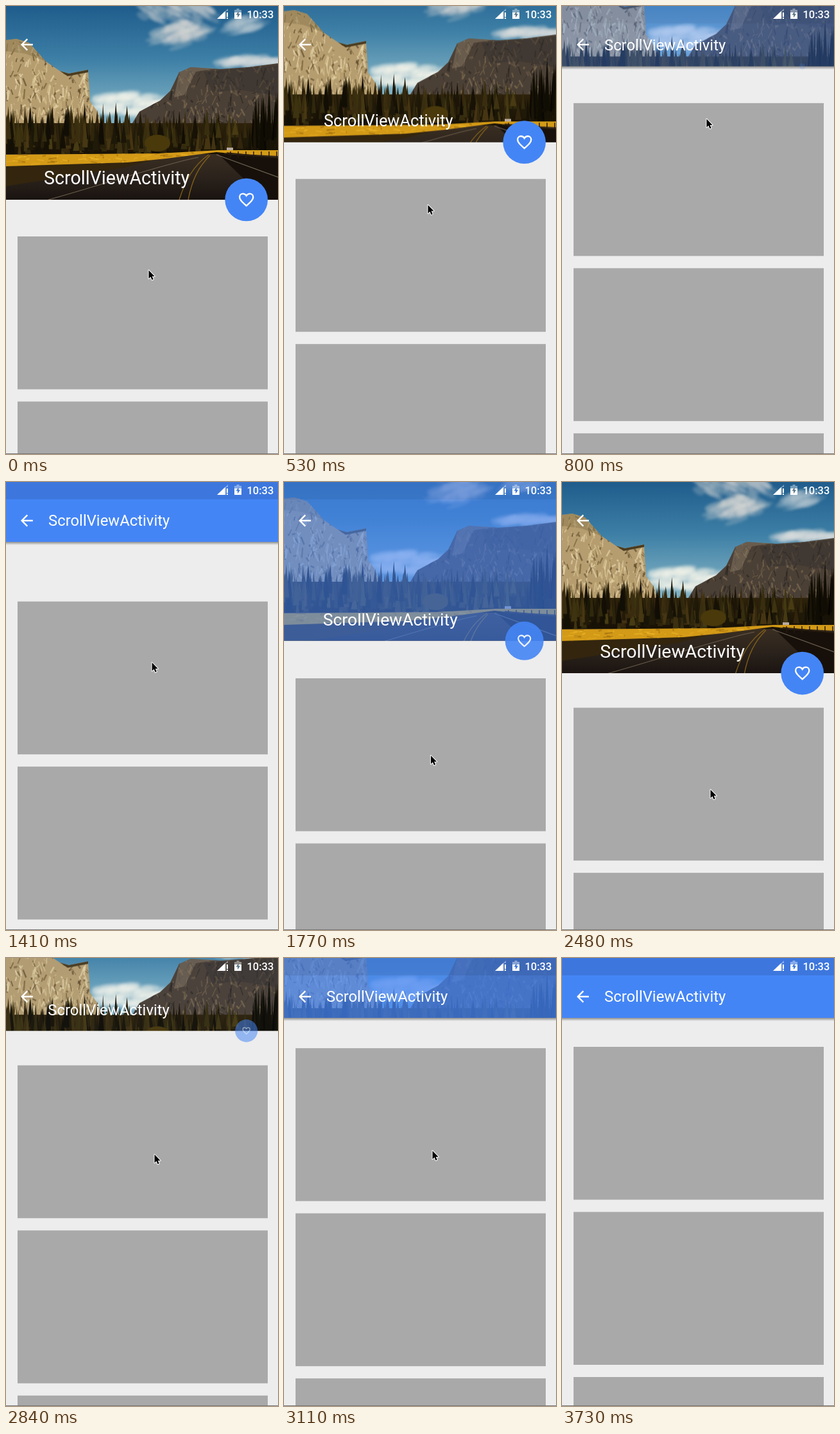
Recreate the animation shown at these times as an HTML page with a canvas. Size 424 by 696 pixels, loop 4480 ms.

```html
<!DOCTYPE html>
<html lang="en">
<head>
<meta charset="utf-8">
<title>Collapsing header</title>
<style>
  html, body { margin: 0; width: 100%; height: 100%; overflow: hidden; background: #ededed; }
  canvas { display: block; }
</style>
</head>
<body>
<canvas id="stage" width="424" height="696"></canvas>
<script>
const W = 424, HEIGHT = 696, LOOP = 4480, STEP = 90;
const EXPANDED = 301, COLLAPSED = 93, RANGE = EXPANDED - COLLAPSED, GAP = 57, DP = W / 360;
const BLUE = '#4485f6';
const ctx = document.getElementById('stage').getContext('2d');

// The picture moves in bursts of 90 ms steps: [start, number of steps]
const bursts = [[0, 1], [350, 6], [880, 3], [1230, 6], [1770, 6], [2390, 6], [2930, 4], [3640, 2]];

const arrowIcon = new Path2D('M20 11H7.83l5.59-5.59L12 4l-8 8 8 8 1.41-1.41L7.83 13H20z');
const heartIcon = new Path2D('M12 20C6 14.6 3 11.9 3 8.5C3 6 5 4 7.5 4C9.3 4 11 5 12 6.7C13 5 14.7 4 16.5 4C19 4 21 6 21 8.5C21 11.9 18 14.6 12 20Z');
const mouseIcon = new Path2D('M0 0V13L3 10.2L5 15L7.2 14L5.2 9.4H9.2Z');
const batteryIcon = new Path2D('M356 6H359.5V4H363.5V6H367V20H356Z');
const boltIcon = new Path2D('M362.6 8L358.6 13.8H361V18.2L365 12.2H362.6Z');

const lerp = (a, b, f) => a + (b - a) * f;
const linear = u => u;
const smooth = u => u * u * (3 - 2 * u);
const easeIn = u => u * u;
const easeOut = u => 1 - (1 - u) ** 2;

function ramp(t, start, end, ease = linear) {
  return ease(Math.min(1, Math.max(0, (t - start) / (end - start))));
}

function snap(t) {
  const [start, count] = bursts.filter(b => b[0] <= t).pop();
  return start + STEP * Math.min(count - 1, Math.floor((t - start) / STEP));
}

// Swipe up, pull down, swipe up again; the header lags behind the pull
function pose(t) {
  const swipe = ramp(t, 290, 820, smooth);
  const again = ramp(t, 2419, 2862, easeIn);
  const slip = 3.4 * ramp(t, 2390, 2480) + 8.6 * ramp(t, 2840, 3200);
  const late = t >= 3640;
  return {
    header: EXPANDED - RANGE * (swipe - ramp(t, 1410, 2145, easeOut) + again),
    content: EXPANDED + GAP - slip - RANGE * (swipe - ramp(t, 1177, 2062, smooth) + again),
    scrim: ramp(t, 620, 1090) - ramp(t, 1680, 1900) + ramp(t, 2830, 3200),
    fab: 1 - ramp(t, 620, 830) + ramp(t, 1590, 1790) - ramp(t, 2750, 2940),
    mouseX: late ? 259 : 222 + 9 * ramp(t, 0, 2480),
    mouseY: late ? 425 : 410 - 236 * swipe + 316 * ramp(t, 1225, 2225, easeOut) - 191 * ramp(t, 2404, 2891, smooth)
  };
}

function paintLandscape() {
  const canvas = document.createElement('canvas');
  canvas.width = W;
  canvas.height = EXPANDED;
  const c = canvas.getContext('2d');
  let seed = 7;
  const rand = (lo, hi) => {
    seed = (seed * 16807) % 2147483647;
    return lo + (hi - lo) * seed / 2147483647;
  };
  const times = (n, paint) => { for (let i = 0; i < n; i++) paint(i); };
  const fill = (d, color) => { c.fillStyle = color; c.fill(new Path2D(d)); };
  const line = (d, color, width) => {
    c.strokeStyle = color;
    c.lineWidth = width;
    c.stroke(new Path2D(d));
  };
  const gradient = (y0, y1, ...colors) => {
    const g = c.createLinearGradient(0, y0, 0, y1);
    colors.forEach((color, i) => g.addColorStop(i / (colors.length - 1), color));
    return g;
  };
  const cloud = (x, y, w, h, tilt, color) => times(60, () => {
    const a = rand(0, Math.PI * 2), r = Math.sqrt(rand(0, 1));
    c.fillStyle = color;
    c.beginPath();
    c.ellipse(x + Math.cos(a) * r * w, y + Math.sin(a) * r * h, rand(8, 22), rand(2, 6), tilt, 0, Math.PI * 2);
    c.fill();
  });
  // Fills an outline, then scratches it with short strokes
  const texture = (d, base, count, [x0, x1, y0, y1], dx, dy, shades) => {
    c.save();
    fill(d, base);
    c.clip(new Path2D(d));
    times(count, i => line(`M${rand(x0, x1)} ${rand(y0, y1)}l${rand(-dx, dx)} ${rand(1, dy)}`,
      shades[i % shades.length], rand(.8, 3)));
    c.restore();
  };

  c.fillStyle = gradient(0, 165, '#1f5c8c', '#3d7fa6', '#7fb0c2');
  c.fillRect(0, 0, W, EXPANDED);
  c.filter = 'blur(2px)';
  cloud(262, 12, 66, 18, .5, '#d5d6d540');
  cloud(272, 46, 42, 18, -.3, '#d9d9d840');
  cloud(372, 30, 24, 12, -.4, '#c0d0d722');
  cloud(385, 86, 48, 6, -.2, '#dcdfdf40');
  cloud(195, 152, 58, 17, -.1, '#f6f4ec66');
  c.filter = 'none';

  texture('M0 53L16 51L36 57L62 86L84 101L98 105L128 99L131 148L144 166L150 190H0Z', '#b69d6f', 330,
    [0, 150, 50, 185], 6, 17, ['#e6d5a8aa', '#6b552fa0', '#d6c18daa', '#3f2f1780', '#efe0b890']);
  fill('M0 53L16 51L36 57L60 85L30 74L0 70Z', '#8c784e88');
  fill('M84 101L98 105L128 99V103L96 109Z', '#4a3b1f');

  texture('M192 190L208 164L240 147L256 132L270 103L288 95L334 98L378 95L424 89V200H192Z', '#4b4036', 300,
    [192, 424, 92, 190], 7, 15, ['#8b785c90', '#29231f99', '#6d5d4999', '#332c2aaa', '#7d6949aa']);
  fill('M270 103L288 95L328 97L296 102L278 138L262 142Z', '#8b7d6877');
  fill('M308 102L424 92V140L364 130L322 134Z', '#342f2d77');

  c.fillStyle = gradient(178, 232, '#30240b', '#171005');
  c.fillRect(0, 182, W, 50);
  times(300, () => {
    const x = rand(-4, W + 4), base = rand(200, 231), w = rand(2.5, 5.5), edge = x > 385;
    const tall = edge ? rand(45, 84) : rand(24, x < 200 ? 54 : 42);
    fill(`M${x} ${base - tall}L${x + w} ${base}H${x - w}Z`, `hsl(${rand(38, 48)} 58% ${edge ? rand(2, 7) : rand(4, 18)}%)`);
  });
  c.fillStyle = '#4a390b';
  c.beginPath();
  c.ellipse(236, 213, 20, 13, 0, 0, Math.PI * 2);
  c.fill();

  c.fillStyle = gradient(230, EXPANDED, '#3a2e22', '#2b231c', '#191310');
  c.fillRect(0, 230, W, 71);
  fill('M0 246L250 234L180 252L0 280Z', '#33250e');
  texture('M0 231L240 229L330 224H424V233L350 229L328 227L250 237L190 243L0 249Z', '#d39a17', 140,
    [0, W, 226, 249], 16, 2, ['#f0b92a99', '#9c6a0c88', '#e3a81f99']);
  fill('M330 229L424 236V301H404Z', '#17100a');
  line('M300 235C240 247 150 278 66 301', '#6b5e4d', 1.2);
  line('M316 231C292 248 280 270 270 301M318 232C300 250 290 270 284 301', '#85621b', 1.3);
  line('M328 231L424 266', '#6e6454', 1.2);
  line('M344 228L424 236', '#2b1d0e', 1.5);
  for (let x = 350; x < W; x += 12) line(`M${x} 226v10`, '#251a0e', 1.5);
  fill('M344 220H354V224H344Z', '#b9aaa0');
  return canvas;
}

const landscape = paintLandscape();

function rect(x, y, w, h, color) {
  ctx.fillStyle = color;
  ctx.fillRect(x, y, w, h);
}

function text(string, x, y, size, weight = 400) {
  ctx.fillStyle = '#fff';
  ctx.font = `${weight} ${size}px Roboto, sans-serif`;
  ctx.fillText(string, x, y);
}

function drawHeader(height, scrim) {
  if (height < 96) {
    const shadow = ctx.createLinearGradient(0, height, 0, height + 5);
    shadow.addColorStop(0, '#0006');
    shadow.addColorStop(1, '#0000');
    rect(0, height, W, 5, shadow);
  }
  ctx.save();
  ctx.beginPath();
  ctx.rect(0, 0, W, height);
  ctx.clip();
  ctx.drawImage(landscape, 0, (height - EXPANDED) / 2);
  ctx.globalAlpha = scrim;
  rect(0, 0, W, height, BLUE);
  rect(0, 0, W, 27, '#0000001a');
  ctx.restore();

  ctx.save();
  ctx.translate(18.3, 45.9);
  ctx.scale(DP, DP);
  ctx.fillStyle = '#fff';
  ctx.fill(arrowIcon);
  ctx.restore();

  const f = (EXPANDED - height) / RANGE;
  text('ScrollViewActivity', lerp(59, 66, f), lerp(277, 68.4, f), lerp(24.3, 20.25, easeOut(f)) * DP);
}

function drawStatus(scrim) {
  ctx.fillStyle = '#fff6';
  ctx.fill(new Path2D('M329 20L346 4V8H343V20Z'));
  ctx.fill(batteryIcon);
  ctx.fillStyle = '#fff';
  ctx.fill(new Path2D('M329 20L341.5 8V20ZM344 10H346V17H344ZM344 18H346V20H344Z'));
  ctx.save();
  ctx.clip(batteryIcon);
  rect(356, 10, 11, 10, '#fff');
  ctx.restore();
  ctx.fillStyle = scrim > .5 ? '#3d77dd' : '#5b7788';
  ctx.fill(boltIcon);
  text('10:33', 375.5, 18.5, 14 * DP, 500);
}

function drawFab(y, scale) {
  if (scale < .01) return;
  ctx.save();
  ctx.globalAlpha = scale;
  ctx.translate(374.7, y);
  ctx.scale(scale * DP, scale * DP);
  ctx.fillStyle = BLUE;
  ctx.beginPath();
  ctx.arc(0, 0, 28.3, 0, Math.PI * 2);
  ctx.fill();
  ctx.translate(-12, -12);
  ctx.strokeStyle = '#fff';
  ctx.lineWidth = 2;
  ctx.stroke(heartIcon);
  ctx.restore();
}

function drawMouse(x, y) {
  ctx.save();
  ctx.translate(x + .5, y + .5);
  ctx.lineJoin = 'round';
  ctx.strokeStyle = '#fff';
  ctx.lineWidth = 2;
  ctx.stroke(mouseIcon);
  ctx.fillStyle = '#000';
  ctx.fill(mouseIcon);
  ctx.restore();
}

function draw(now) {
  const t = snap(now % LOOP);
  const { header, content, scrim, fab, mouseX, mouseY } = pose(t);
  rect(0, 0, W, HEIGHT, '#ededed');
  for (let y = content; y < HEIGHT; y += 256.5) rect(18, y, 390, 237.5, '#a9a9a9');
  rect(0, HEIGHT - 1, W, 1, '#777');
  drawHeader(header, scrim);
  drawStatus(scrim);
  drawFab(header, fab);
  if (t < 3730) drawMouse(mouseX, mouseY);
}

const begin = performance.now();
function tick() {
  draw(performance.now() - begin);
  requestAnimationFrame(tick);
}
tick();
</script>
</body>
</html>
```
